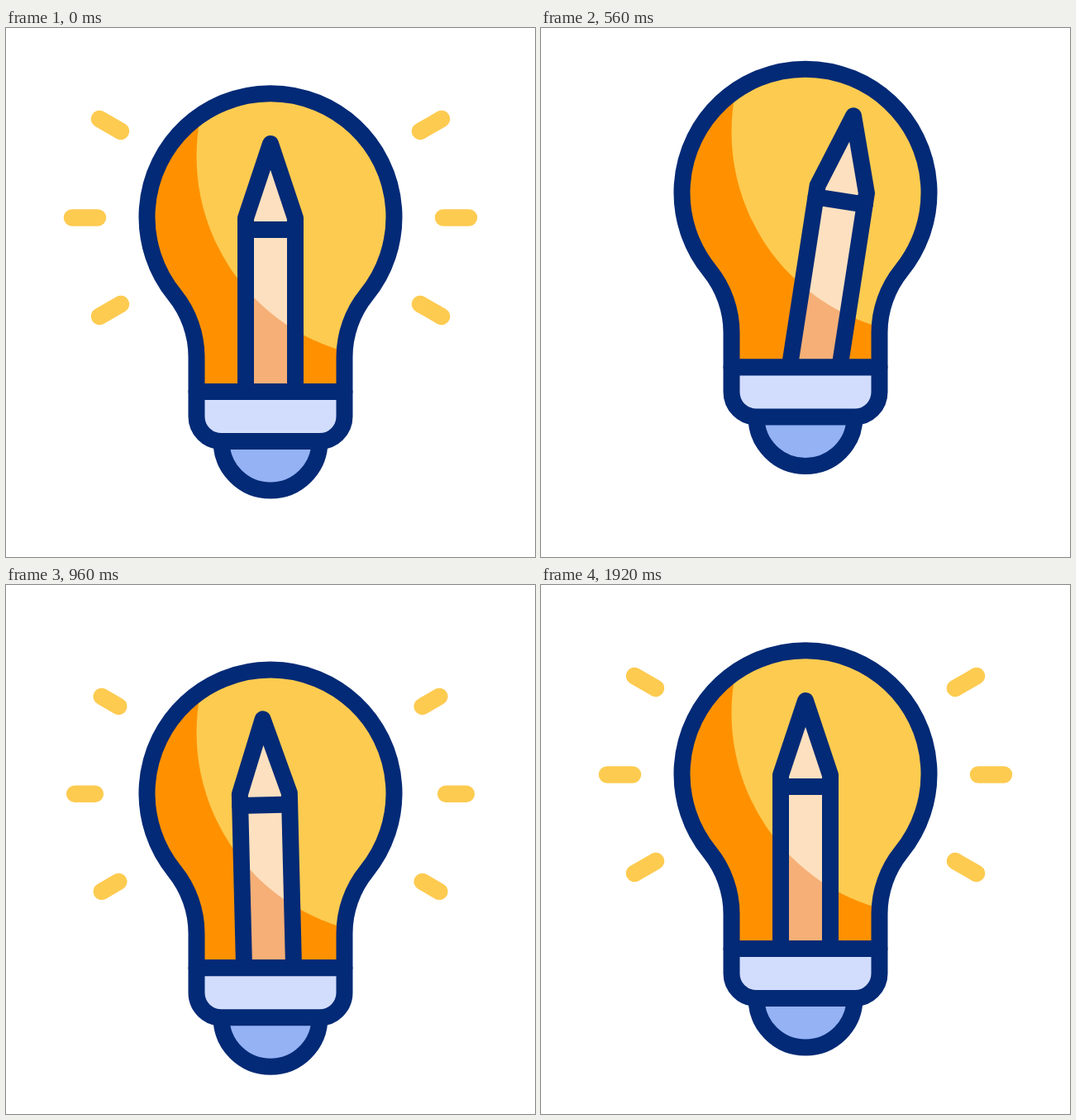
An HTML page that plays this animation: 640x640 px, repeating every 2000 ms.

```html
<!DOCTYPE html>
<html lang="en">
<head>
<meta charset="utf-8">
<title>Light bulb with pencil</title>
<style>
  html, body { margin: 0; width: 100%; height: 100%; overflow: hidden; background: #fff; }
  svg { display: block; width: 100vw; height: 100vh; }
  .line { fill: none; stroke: #032a76; stroke-width: 20; stroke-linejoin: round; stroke-linecap: round; }
  #rays line { stroke: #fdcb50; stroke-width: 20.5; stroke-linecap: round; }
</style>
</head>
<body>
<svg viewBox="0 0 640 640">
  <defs>
    <path id="glass" d="M230.5 440V398C230.5 371 221 344 204 323A149.5 149.5 0 1 1 436 323C419 344 409.5 371 409.5 398V440Z"/>
    <path id="pencil" d="M290 485V230L320 140L350 230V485"/>
    <clipPath id="inGlass"><use href="#glass"/></clipPath>
    <clipPath id="inPencil"><use href="#pencil" class="sway"/></clipPath>
  </defs>
  <g id="scene">
    <g id="rays"></g>
    <g clip-path="url(#inGlass)">
      <rect x="150" y="60" width="340" height="390" fill="#ff9100"/>
      <circle cx="476" cy="155" r="245.5" fill="#fdcb50"/>
    </g>
    <g clip-path="url(#inPencil)">
      <rect x="150" y="60" width="340" height="390" fill="#f6af76"/>
      <circle cx="476" cy="155" r="245.5" fill="#fde0bf"/>
    </g>
    <g class="line sway">
      <use href="#pencil"/>
      <path d="M290 244H350"/>
    </g>
    <use href="#glass" class="line"/>
    <path class="line" style="fill:#94b2f4" d="M260.5 500A59.5 59.5 0 0 0 379.5 500"/>
    <path class="line" style="fill:#d2ddfd" d="M230.5 440H409.5V470A30 30 0 0 1 379.5 500H260.5A30 30 0 0 1 230.5 470Z"/>
  </g>
</svg>
<script>
const LOOP = 2000, STEP = 40;

// Keys are [time, value] pairs, eased in and out between neighbours.
const BOUNCE = [[80, 0], [320, 38.5], [600, -33.5], [840, 38.5], [1120, 0]];
const ANGLE = [[80, 0], [320, -12], [600, 10], [840, -7.2], [1120, 7.5], [1440, 0]];
const SLIDE = [[80, 0], [320, 26], [600, -10.7], [840, -1.8], [1120, 0]];

// Each pass draws a ray between two moving ends, measured from its inner end.
const PASSES = [
  { from: 0, to: 600, start: [[80, 0], [560, 1]], end: [[0, 1]] },
  { from: 600, to: 1400, start: [[880, 0], [1280, 1]], end: [[640, 0], [1040, 1]] },
  { from: 1400, to: LOOP, start: [[0, 0]], end: [[1440, 0], [1920, 1]] }
];

function valueAt(keys, t) {
  if (t <= keys[0][0]) return keys[0][1];
  for (let i = 1; i < keys.length; i++) {
    const [t0, a] = keys[i - 1], [t1, b] = keys[i];
    if (t < t1) {
      const u = (t - t0) / (t1 - t0);
      return a + (b - a) * u * u * (3 - 2 * u);
    }
  }
  return keys[keys.length - 1][1];
}

const scene = document.getElementById("scene");
const swaying = document.querySelectorAll(".sway");
const rayGroup = document.getElementById("rays");

// Inner end followed by outer end, on the left side.
const leftRays = [
  [139, 125, 113, 110],
  [111, 229.5, 80, 229.5],
  [139, 334, 113, 349]
];
const mirror = ([x1, y1, x2, y2]) => [640 - x1, y1, 640 - x2, y2];
const rays = [...leftRays, ...leftRays.map(mirror)].map(ends => {
  const node = document.createElementNS("http://www.w3.org/2000/svg", "line");
  rayGroup.appendChild(node);
  return { node, ends };
});

function drawRays(t) {
  const pass = PASSES.find(p => t >= p.from && t < p.to);
  const start = valueAt(pass.start, t), end = valueAt(pass.end, t);
  rayGroup.style.display = end > start ? "" : "none";
  for (const { node, ends: [x1, y1, x2, y2] } of rays) {
    node.setAttribute("x1", x1 + (x2 - x1) * start);
    node.setAttribute("y1", y1 + (y2 - y1) * start);
    node.setAttribute("x2", x1 + (x2 - x1) * end);
    node.setAttribute("y2", y1 + (y2 - y1) * end);
  }
}

function draw(t) {
  scene.setAttribute("transform", `translate(0 ${valueAt(BOUNCE, t)})`);
  const sway = `translate(0 ${valueAt(SLIDE, t)}) rotate(${valueAt(ANGLE, t)} 320 520)`;
  swaying.forEach(node => node.setAttribute("transform", sway));
  drawRays(t);
}

let origin = null;
function tick(now) {
  if (origin === null) origin = now;
  draw(Math.floor(((now - origin) % LOOP) / STEP) * STEP);
  requestAnimationFrame(tick);
}
draw(0);
requestAnimationFrame(tick);
</script>
</body>
</html>
```
